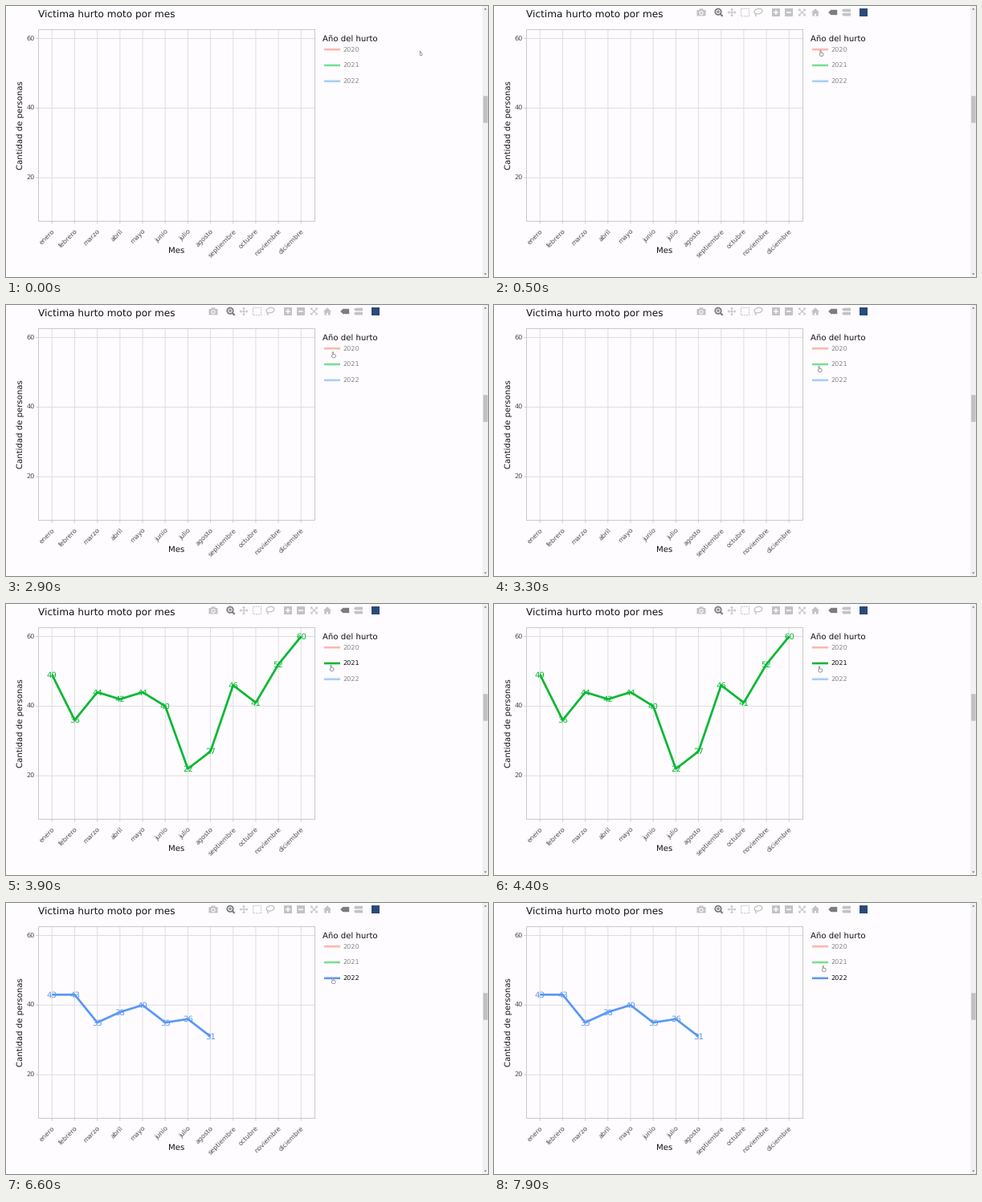
A matplotlib script that plays this animation: 600x338 px, repeating every 8000 ms.

```python
import numpy as np
import matplotlib.pyplot as plt
from matplotlib.animation import FuncAnimation
from matplotlib.patches import Circle, Ellipse, Polygon, Rectangle

W, H, DPI = 600, 338, 100
PX = 72 / DPI
STEP, LOOP = 100, 8000

BG = "#fefcff"
GRID, BORDER, TICK = "#dedde0", "#c9c8ca", "#4d4d4d"
ICON, ICON_ON, BADGE = "#c3c2c5", "#7d7c80", "#2b4a78"
TITLE_SIZE, NAME_SIZE, TICK_SIZE = 12.1, 10.1, 8.1

LEFT, RIGHT, TOP, BOTTOM = 40.5, 384.5, 29.5, 268.5
MONTHS = ("enero febrero marzo abril mayo junio julio agosto "
          "septiembre octubre noviembre diciembre").split()

# year, active colour, dimmed colour, shown from, shown until, thefts per month
SERIES = [
    ("2020", "#ef7067", "#fcb7b2", 1300, 2900,
     [35, 51, 10, 16, 28, 41, 46, 38, 56, 42, 41, 57]),
    ("2021", "#06b833", "#78df90", 3900, 5500,
     [49, 36, 44, 42, 44, 40, 22, 27, 46, 41, 52, 60]),
    ("2022", "#5b97f5", "#a7cdf9", 6600, LOOP,
     [43, 43, 35, 38, 40, 35, 36, 31]),
]

# pointer moves: start time, end time, destination
HOME = (516.8, 59.3)
MOVES = [(0, 500, (407.5, 59)), (1200, 1600, (408, 60)),
         (2800, 3300, (405.5, 80)), (3900, 4400, (406, 81.5)),
         (5400, 6100, (407.5, 97)), (7500, 7900, (410.6, 82))]
LEGEND_EDGE = 441

plt.rcParams.update({"font.family": "DejaVu Sans", "text.hinting": "none",
                     "toolbar": "None"})
fig = plt.figure(figsize=(W / DPI, H / DPI), dpi=DPI, facecolor=BG)
ax = fig.add_axes([0, 0, 1, 1])
ax.set_xlim(0, W)
ax.set_ylim(H, 0)
ax.axis("off")


def text(x, y, s, size, color="#111111", **kw):
    return ax.text(x, y, s, fontsize=size * PX, color=color, va="baseline",
                   rotation_mode="anchor", **kw)


def line(xs, ys, color, width=1, z=1, **kw):
    kw.setdefault("solid_capstyle", "butt")
    return ax.plot(xs, ys, color=color, lw=width * PX, zorder=z,
                   snap=False, **kw)[0]


def shape(patch, color, z=1, edge="none", width=0):
    patch.set(facecolor=color, edgecolor=edge, linewidth=width * PX,
              zorder=z, snap=False, joinstyle="round")
    return ax.add_patch(patch)


def box(cx, cy, w, h, color, z=1):
    return shape(Rectangle((cx - w / 2, cy - h / 2), w, h), color, z)


def triangle(cx, cy, dx, dy, size, color):
    """Triangle whose base is centred at (cx, cy), pointing along (dx, dy)."""
    u = np.array([dx, dy]) / np.hypot(dx, dy) * size
    side = np.array([-u[1], u[0]])
    c = np.array([cx, cy])
    return shape(Polygon([c + u, c + side, c - side]), color)


def px_x(i):
    return 57.3 + 28.18 * i


def px_y(v):
    return 301.1 - 4.343 * v


def draw_chart():
    for v in (20, 40, 60):
        y = px_y(v)
        line([LEFT, RIGHT], [y, y], GRID)
        line([LEFT - 3, LEFT], [y, y], BORDER)
        text(36, y + 3, str(v), TICK_SIZE, TICK, ha="right")
    for i, name in enumerate(MONTHS):
        x = px_x(i)
        line([x, x], [TOP, BOTTOM], GRID)
        line([x, x], [BOTTOM, BOTTOM + 3], BORDER)
        text(x + 4, 281, name, TICK_SIZE, TICK, ha="right", rotation=45)
    shape(Rectangle((LEFT, TOP), RIGHT - LEFT, BOTTOM - TOP), "none", 2,
          BORDER, 1)
    text(40, 14, "Victima hurto moto por mes", TITLE_SIZE)
    text(20.5, 149, "Cantidad de personas", NAME_SIZE, ha="center",
         rotation=90)
    text(212, 307.5, "Mes", NAME_SIZE, ha="center")
    text(394, 43.6, "Año del hurto", NAME_SIZE)


def draw_scrollbar():
    box(596.5, H / 2, 7, H, "#f1f0f2")
    box(596.8, 129, 5.5, 33.5, "#c1c0c2", 2)
    triangle(596.7, 4.4, 0, -1, 1.6, "#555555")
    triangle(596.7, 333.6, 0, 1, 1.6, "#555555")


def arrows(cx, angle, reach):
    """Four arrows leaving a centre, turned by the given angle."""
    parts = []
    for a in np.radians(angle + 90 * np.arange(4)):
        dx, dy = np.cos(a), np.sin(a)
        r = reach - 2.2
        parts += [line([cx, cx + r * dx], [8, 8 + r * dy], ICON, 1.1),
                  triangle(cx + r * dx, 8 + r * dy, dx, dy, 2.2, ICON)]
    return parts


def tag(x, cy, h, color):
    """Label plate with a point on its left side."""
    top, low = cy - h / 2, cy + h / 2
    return shape(Polygon([(x, cy), (x + h / 2, top), (x + 11, top),
                          (x + 11, low), (x + h / 2, low)]), color)


def sign(cx, cy, r, color, width, plus):
    parts = [line([cx - r, cx + r], [cy, cy], color, width, 3)]
    if plus:
        parts.append(line([cx, cx], [cy - r, cy + r], color, width, 3))
    return parts


def draw_toolbar():
    camera = [box(258, 8.7, 11, 7.4, ICON), box(258, 4.4, 5, 2, ICON),
              shape(Circle((258, 8.7), 2.1), ICON, 2, BG, 1.1)]
    zoom = [shape(Circle((279, 7.2), 3.7), BG, 2, ICON_ON, 1.8),
            line([281.6, 284.6], [9.8, 12.8], ICON_ON, 2.2),
            *sign(279, 7.2, 2, ICON_ON, 1.2, True)]
    select = [line([307.5, 317.5, 317.5, 307.5, 307.5],
                   [3.3, 3.3, 12.7, 12.7, 3.3], ICON, 1.2, dashes=(1.4, 1.1))]
    lasso = [shape(Ellipse((329, 6.6), 10, 6.4, angle=-12), "none", 1,
                   ICON, 1.3),
             line([325.3, 325.3, 326.8], [9, 11, 13], ICON, 1.3)]
    steps = []
    for x, plus in ((351, True), (367, False)):
        steps += [box(x, 8, 10, 10, ICON), *sign(x, 8, 3, BG, 1.5, plus)]
    house = [triangle(400, 8.2, 0, -1, 5, ICON), box(400, 10.3, 7.4, 4.6, ICON),
             box(400, 11.2, 2, 2.8, BG, 2)]
    hover = [tag(416.2, 8, 6.4, ICON_ON), tag(433, 5.5, 3.7, ICON),
             tag(433, 10.6, 3.7, ICON)]
    return (camera + zoom + arrows(296, 0, 5.4) + select + lasso + steps
            + arrows(383.5, 45, 6.2) + house + hover
            + [box(460, 8, 10, 10, BADGE)])


def draw_series():
    out = []
    for k, (year, color, dim, start, end, values) in enumerate(SERIES):
        y = 54.2 + 19.8 * k
        key = line([396, 416], [y, y], dim, 2.6)
        label = text(419.6, y + 3.2, year, TICK_SIZE)
        xs = px_x(np.arange(len(values)))
        ys = px_y(np.array(values))
        marks = [line(xs, ys, color, 2.7, 4)]
        marks += [text(a, b + 3.6, str(v), NAME_SIZE, color, ha="center",
                       zorder=5) for a, b, v in zip(xs, ys, values)]
        out.append((key, label, marks, color, dim, start, end))
    return out


def draw_pointers():
    arrow = np.array([(-1.5, -3), (-1.5, 2), (0.6, 2.5), (1.6, 0.7)])
    # half a fist with one raised finger
    turn = np.radians(np.linspace(-45, 190, 8))
    fist = np.c_[0.2 + 2.5 * np.cos(turn), 1.4 + 2.3 * np.sin(turn)]
    finger = [(-1.5, 0.6), (-1.5, -3.4), (-0.3, -3.4), (-0.3, -0.8)]
    hand = np.vstack([fist, finger])
    return [(pts, shape(Polygon(pts), "#ffffff", 10, "#85858a", 0.8))
            for pts in (arrow, hand)]


def pointer_at(t):
    pos = np.array(HOME)
    for start, end, goal in MOVES:
        u = np.clip((t - start) / (end - start), 0, 1)
        way = np.array(goal) - pos
        sag = 0.07 * abs(way[0]) * np.sin(np.pi * u)
        pos = pos + way * u * u * (3 - 2 * u) + (0, sag)
        if u < 1:
            break
    return pos


draw_chart()
draw_scrollbar()
toolbar = draw_toolbar()
series = draw_series()
pointers = draw_pointers()


def update(frame):
    t = frame * STEP
    for part in toolbar:
        part.set_alpha(min(t / 400, 1))
    for key, label, marks, color, dim, start, end in series:
        on = start <= t < end
        key.set_color(color if on else dim)
        label.set_color("#151515" if on else "#8a898c")
        for mark in marks:
            mark.set_visible(on)
    pos = pointer_at(t)
    over_legend = pos[0] < LEGEND_EDGE
    for is_hand, (pts, patch) in enumerate(pointers):
        patch.set_xy(pts + pos)
        patch.set_visible(is_hand == over_legend)
    return []


anim = FuncAnimation(fig, update, frames=LOOP // STEP, interval=STEP,
                     init_func=lambda: update(0), repeat=True, blit=False)
plt.show()
```
